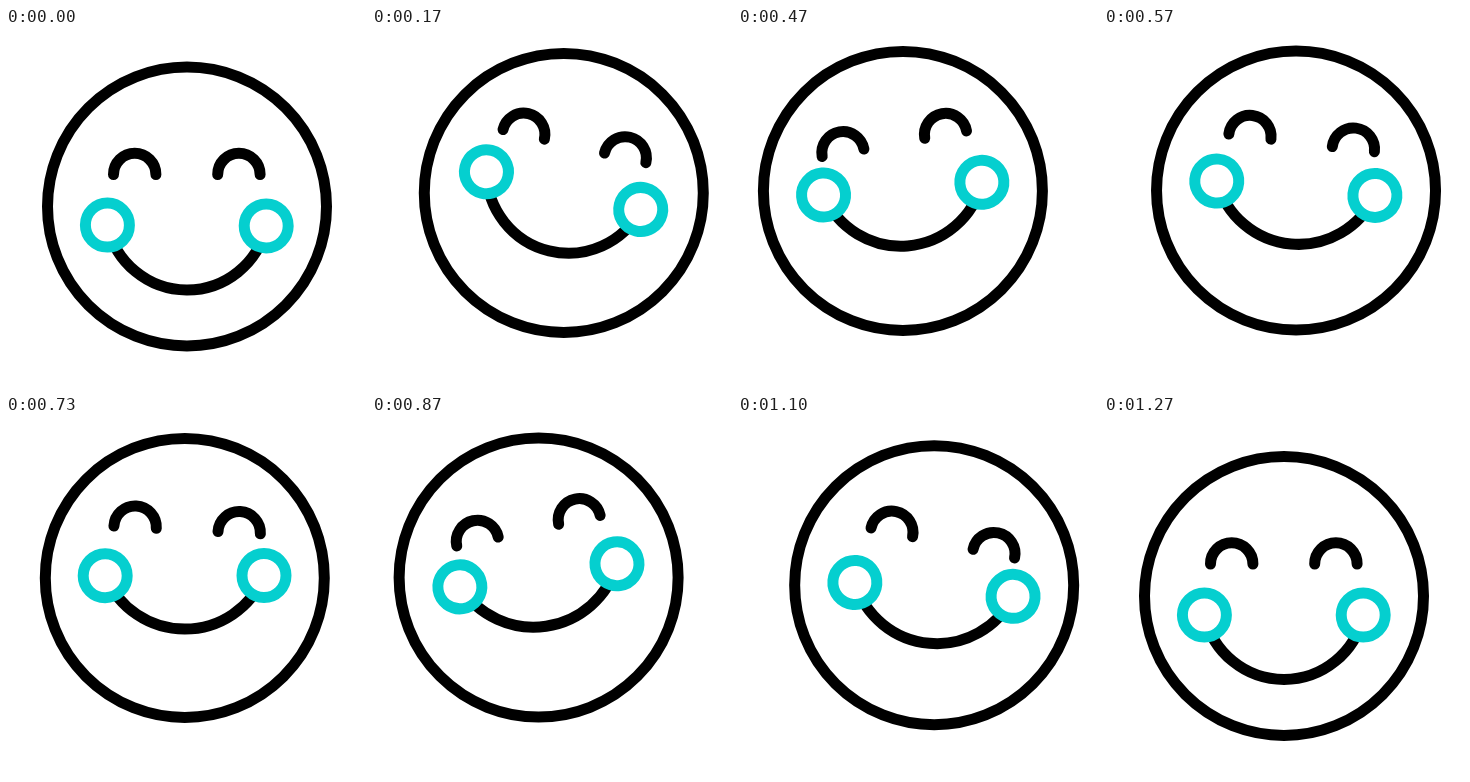
Recreate the animation shown at these times as an HTML page. Size 360 by 360 pixels, loop 1.67 s.

```html
<!DOCTYPE html>
<html lang="en">
<head>
<meta charset="utf-8">
<title>Laughing face</title>
<style>
  html, body { margin: 0; width: 100%; height: 100%; overflow: hidden; background: #fff; }
  svg { display: block; width: 100vw; height: 100vh; }
  .line { fill: none; stroke: #000; stroke-width: 11; stroke-linecap: round; }
  .cheek { fill: #fff; stroke: #05cfcf; stroke-width: 11; }
</style>
</head>
<body>
<svg viewBox="0 0 360 360">
  <g id="head">
    <circle class="line" r="139.5"/>
    <g id="eyes">
      <path class="line" d="M-73.5 0a21.2 21.2 0 0 1 42.4 0"/>
      <path class="line" d="M30.7 0a21.2 21.2 0 0 1 42.4 0"/>
    </g>
    <g id="mouth">
      <path id="smile" class="line"/>
      <circle class="cheek" cx="-79.6" r="22"/>
      <circle class="cheek" cx="79.2" r="22"/>
    </g>
  </g>
</svg>
<script>
const LOOP = 1670, LAST = 38;
const [head, eyes, mouth, smile] =
  ['head', 'eyes', 'mouth', 'smile'].map(id => document.getElementById(id));

// Tracks hold [step, value] pairs at 30 steps per second.
const tracks = {
  x: [[0, 1], [6.3, 13], [12.8, -19], [18.5, 18], [24.9, -15.5], [31.7, 18], [38, 0]],
  y: [[0, -1.5], [6.3, -16.6], [29, -18.5], [38, 0]],
  eyeTurn: [[0, 0], [6, 14], [12.9, -12], [19, 13], [25.9, -12], [33.4, 12], [38, 0]],
  mouthTurn: [[0, 0.3], [6, 14.7], [13.4, -5], [18.6, 8], [25.5, -8.5], [33, 5], [38, 0]],
  lift: [[0, 0], [5, 1], [30, 1], [38, 0]]
};

function at(track, k) {
  let i = 1;
  while (i < track.length - 1 && k > track[i][0]) i++;
  const [k0, v0] = track[i - 1], [k1, v1] = track[i];
  const u = Math.min(1, (k - k0) / (k1 - k0));
  return v0 + (v1 - v0) * (1 - Math.cos(Math.PI * u)) / 2;
}

// The smile flattens steadily, then springs back.
function smileDepth(k) {
  return k < 30 ? 64.5 - k / 2 : at([[30, 49.5], [38, 64.5]], k);
}

function draw(ms) {
  const tick = Math.floor((ms % LOOP) / 10);
  const k = Math.min(LAST, Math.floor((tick + 0.5) * 0.3));
  const lift = at(tracks.lift, k);
  head.setAttribute('transform',
    `translate(${180 + at(tracks.x, k)} ${180 + at(tracks.y, k)})`);
  eyes.setAttribute('transform',
    `rotate(${at(tracks.eyeTurn, k)}) translate(0 ${-32 - 16 * lift})`);
  mouth.setAttribute('transform',
    `translate(0 ${19 - 21.3 * lift}) rotate(${at(tracks.mouthTurn, k)})`);

  const half = 79.4, depth = smileDepth(k);
  const r = (half * half + depth * depth) / (2 * depth);
  smile.setAttribute('d', `M${-half} 0A${r} ${r} 0 0 0 ${half} 0`);
}

const start = performance.now();
function tickFrame() {
  draw(performance.now() - start);
  requestAnimationFrame(tickFrame);
}
tickFrame();
</script>
</body>
</html>
```
